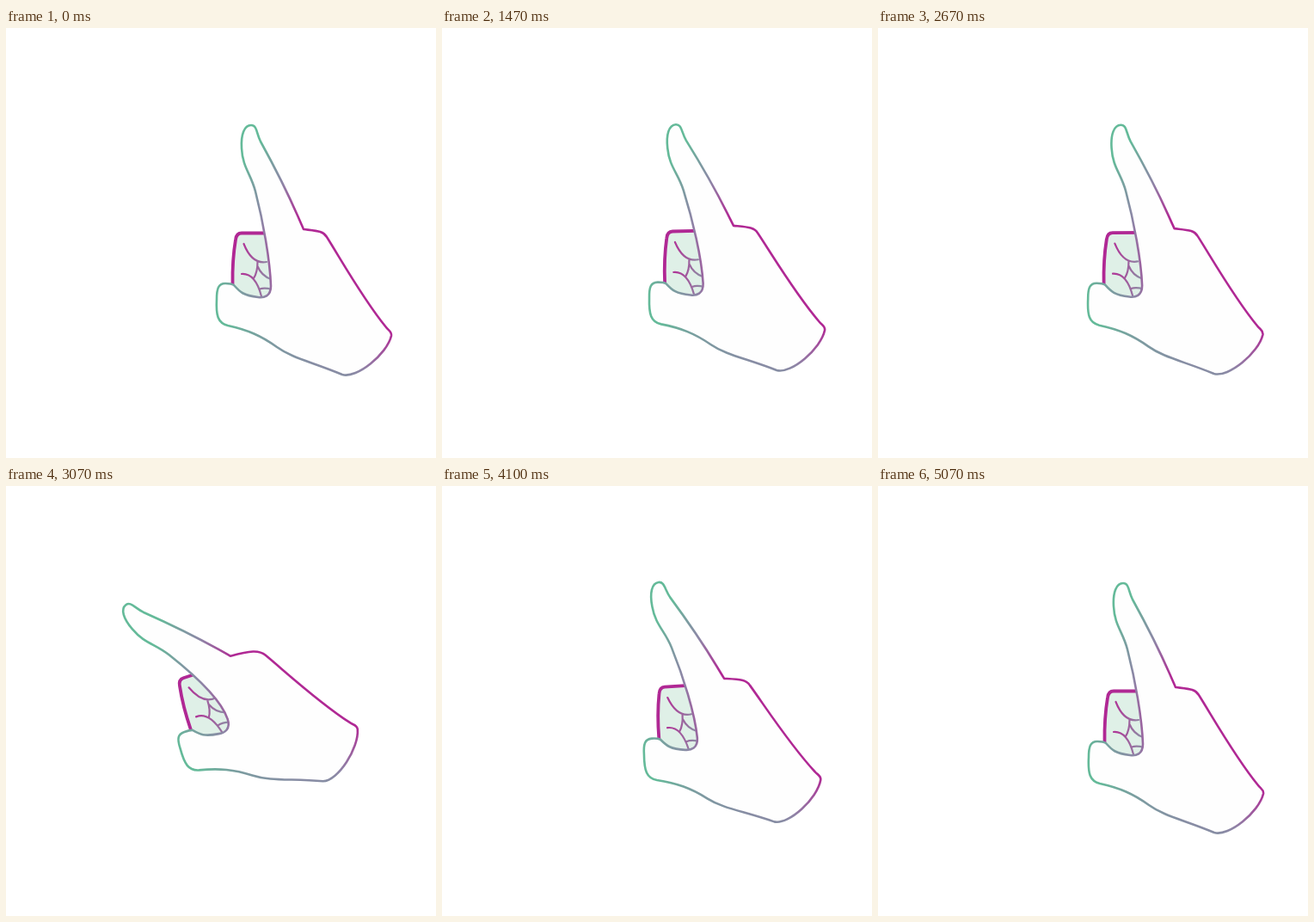
An HTML page for the animation above (5.11 s loop, 500x500 px).

```html
<!DOCTYPE html>
<html lang="en">
<head>
<meta charset="utf-8">
<title>Tapping hand</title>
<style>
  html, body { margin: 0; width: 100%; height: 100%; overflow: hidden; background: #fff; }
  svg { display: block; width: 100%; height: 100%; }
  path { stroke-linecap: round; stroke-linejoin: round; }
</style>
</head>
<body>
<svg viewBox="0 0 500 500" fill="none">
  <defs>
    <radialGradient id="ink" gradientUnits="userSpaceOnUse" cx="425" cy="265" r="190">
      <stop offset=".49" stop-color="#b02894"/>
      <stop offset=".7" stop-color="#8e84a6"/>
      <stop offset=".98" stop-color="#64ba99"/>
    </radialGradient>
    <linearGradient id="crease" gradientUnits="userSpaceOnUse" x1="278" y1="0" x2="306" y2="0">
      <stop offset="0" stop-color="#ad3a98"/>
      <stop offset="1" stop-color="#8d8ba4"/>
    </linearGradient>
  </defs>
  <path id="rays" stroke="#00a8ff" stroke-width="8"/>
  <g id="fist">
    <path fill="#dff0e7" d="M263 298Q264 238 274 238.500H318V312H280Z"/>
    <path stroke="#b02894" stroke-width="3.800" d="M263.500 298Q263 270 267 246Q268 238.500 274 238.500H310"/>
    <path stroke="url(#crease)" stroke-width="2.200" d="M276.500 251Q286 275 303 272M292.500 272Q292.500 284 288 291M292.500 277Q297 288 308 292M274 286Q290 285 297 312M295 303.500Q301 301.500 309 304"/>
  </g>
  <path id="hand" fill="#fefefe" stroke="url(#ink)" stroke-width="2.600"/>
</svg>
<script>
const LOOP = 5110, STEPS = 16, HIT = 8;
const PIVOT = [193, 438], JOINT = [332, 268.5];

// Resting outline: finger, notch, thumb, wrist, knuckle and back to the tip.
const OUTLINE = `M285 113C277 113 273 124 274 140C275 162 285 170 290 190
  C299 225 307 270 308 300C308 312 300 314 293 313C276 311 272 307 265 299
  C262 297 259 297 255 297C247 297 245 303 245 315C244 334 246 343 258 346
  C281 351 297 358 315 371C333 384 355 388 391 403C408 408 443 379 448 358
  C449 353 445 352 442 348C415 315 390 270 373 243C369 236 362 236 346 234
  C333 205 328 190 296 132C291 122 292 113 285 113Z`;

const byId = id => document.getElementById(id);
const clamp = v => Math.min(1, Math.max(0, v));

function rotate([x, y], [cx, cy], degrees) {
  const a = degrees * Math.PI / 180, c = Math.cos(a), s = Math.sin(a);
  const dx = x - cx, dy = y - cy;
  return [cx + dx * c - dy * s, cy + dx * s + dy * c];
}

// The finger bends fully; the bend fades out into the palm and the knuckle.
const follow = (x, y) => clamp((300 - y) / 50) * clamp((372 - x) / 26);

// The hand speeds up towards the hit and settles back more gently.
const swing = step => step < HIT
  ? Math.min(1.32, .0163 * step ** 2.3)
  : .0525 * (STEPS - 1 - step) ** 1.54;

// After the hit, rays shoot outwards while their tails catch up.
function rays(age) {
  if (age < 0 || age > 3) return "";
  const tail = 48 + 11 * age, head = 86 - 24 * .3 ** age;
  let d = "";
  for (let k = 0; k < 8; k++) {
    const at = r => rotate([140.5 + r, 153.5], [140.5, 153.5], 45 * k - 1);
    d += `M${at(tail)}L${at(head)}`;
  }
  return d;
}

function draw(step) {
  const u = swing(step);
  const turn = -18 * u, bend = -19 * u;
  const drift = -4 * Math.sin(.85 * Math.PI * u);

  const outline = OUTLINE.replace(/(\d+) (\d+)/g, (_, x, y) => {
    const bent = rotate([+x, +y], JOINT, bend * follow(x, y));
    const [px, py] = rotate(bent, PIVOT, turn);
    return `${(px + drift).toFixed(2)} ${py.toFixed(2)}`;
  });
  const place = `translate(${drift} 0) rotate(${turn} ${PIVOT.join(" ")})`;

  byId("hand").setAttribute("d", outline);
  byId("fist").setAttribute("transform", place);
  byId("ink").setAttribute("gradientTransform", place);
  byId("rays").setAttribute("d", rays(step - HIT));
}

// Steps last 80 ms, moved up to the next thirtieth of a second.
const startOf = n => Math.round(Math.ceil(12 * n / 5) * 10 / 3) * 10;

function stepAt(t) {
  let n = Math.floor(t / 80);
  while (n > 0 && startOf(n) > t) n--;
  return n % STEPS;
}

const begin = performance.now();
function frame() {
  draw(stepAt((performance.now() - begin) % LOOP));
  requestAnimationFrame(frame);
}
frame();
</script>
</body>
</html>
```
